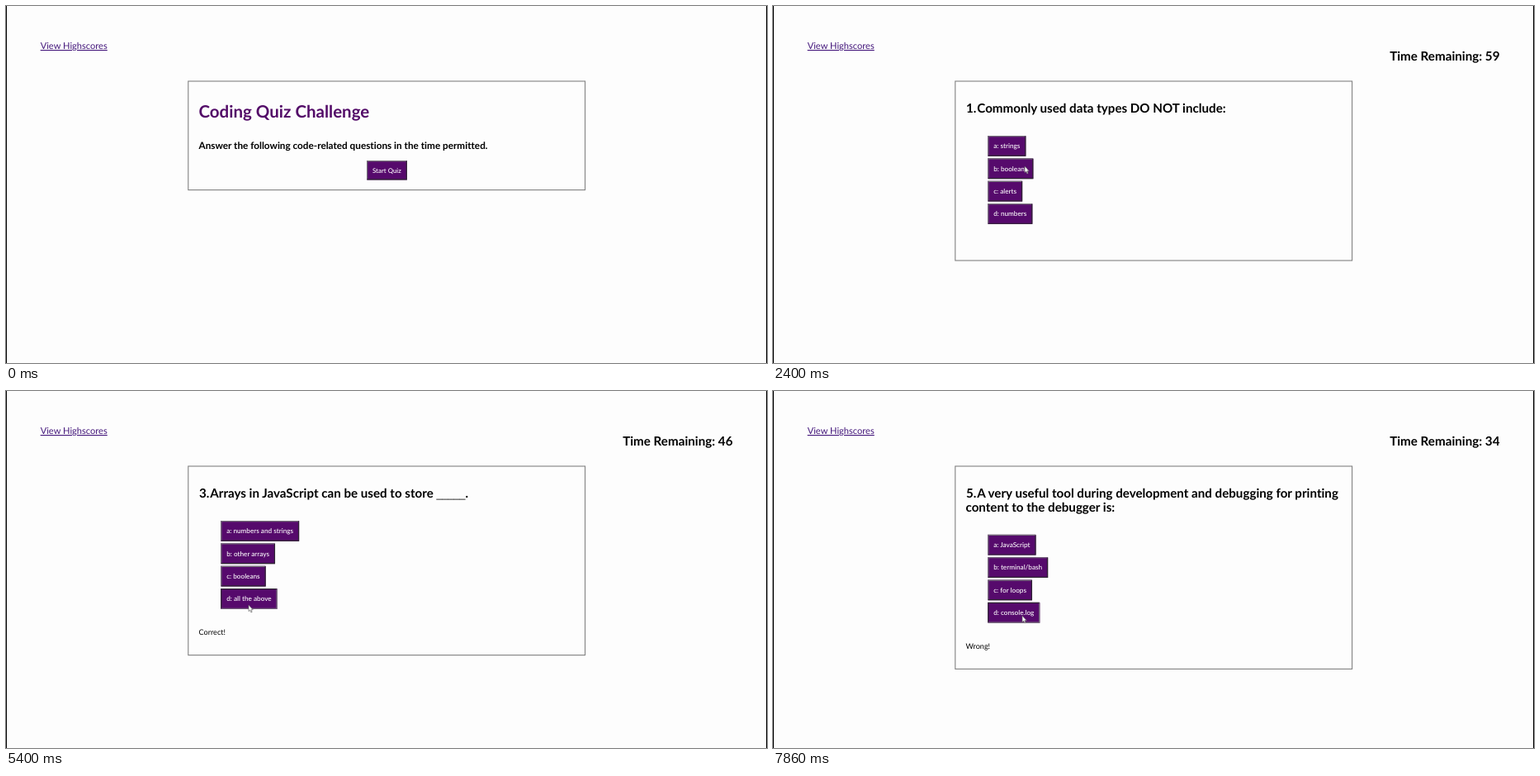
Animation, 922 px wide and 432 px high, one loop 8 s. Source, as an HTML page:

```html
<!DOCTYPE html>
<html lang="en">
<head>
<meta charset="utf-8">
<title>Quiz</title>
<style>
  html, body { margin: 0; width: 100%; height: 100%; overflow: hidden; background: #fdfdfd; }
  svg { display: block; width: 922px; height: 432px; }
  text { font-family: Lato, sans-serif; font-variant-ligatures: none; text-rendering: geometricPrecision; }
  .link { font-size: 11.1px; fill: #45187c; text-decoration: underline; }
  .title { font-size: 20.5px; font-weight: 700; fill: #530b68; }
  .intro { font-size: 11.75px; font-weight: 700; }
  .question { font-size: 15.15px; font-weight: 700; }
  .blank { font: 12.6px "Liberation Sans", sans-serif; }
  .timer { font-size: 15.2px; font-weight: 700; text-anchor: end; }
  .feedback { font-size: 9.1px; }
  .label { font-size: 8.2px; font-weight: 500; fill: #fff; }
  .label.start { font-size: 7.9px; }
  .face { fill: #560a6c; }
  .frame { fill: none; stroke: #808080; stroke-width: 1.1; }
  .edge { fill: none; stroke-width: 1.2; }
  .lit { stroke: #747078; }
  .shade { stroke: #2e2532; }
  .pressed .lit { stroke: #2e2532; }
  .pressed .shade { stroke: #747078; }
  .cursor { fill: #fff; stroke: #666; stroke-width: .7; }
</style>
</head>
<body>
<svg id="stage" viewBox="0 0 922 432"></svg>
<script>
const LOOP = 8000;
const STEP = 200 / 3;
const stage = document.getElementById('stage');

function add(parent, tag, attrs = {}, content = '') {
  const node = document.createElementNS('http://www.w3.org/2000/svg', tag);
  for (const key in attrs) node.setAttribute(key, attrs[key]);
  node.textContent = content;
  parent.append(node);
  return node;
}

const addText = (parent, cls, x, y, content) => add(parent, 'text', { class: cls, x, y }, content);

const addFrame = (parent, bottom) =>
  add(parent, 'rect', { class: 'frame', x: 220.8, y: 91, width: 480.8, height: bottom - 91 });

function addButton(parent, x, y, height, label, cls = '') {
  const group = add(parent, 'g');
  const face = add(group, 'rect', { class: 'face', x, y, height });
  const text = addText(group, 'label ' + cls, x + 7, y + height / 2 + 2.9, label);
  const width = text.getComputedTextLength() + 14;
  face.setAttribute('width', width);
  const left = x + .6, top = y + .6, right = x + width - .6, bottom = y + height - .6;
  add(group, 'path', { class: 'edge lit', d: `M${left} ${bottom}V${top}H${right}` });
  add(group, 'path', { class: 'edge shade', d: `M${right} ${top}V${bottom}H${left}` });
  return group;
}

function addQuestion(parent, x, y, content) {
  const line = addText(parent, 'question', x, y, '');
  for (const part of content.split(/(_+)/)) {
    add(line, 'tspan', part[0] === '_' ? { class: 'blank' } : {}, part);
  }
}

function introPage(page) {
  addFrame(page, 222.6);
  addText(page, 'title', 233.5, 134.5, 'Coding Quiz Challenge');
  addText(page, 'intro', 233.5, 173, 'Answer the following code-related questions in the time permitted.');
  return [addButton(page, 437, 187, 23.4, 'Start Quiz', 'start')];
}

function questionPage(page, { number, lines, answers, feedback }) {
  const shift = (lines.length - 1) * 16.8;
  addFrame(page, (feedback ? 319.6 : 308) + shift);
  addText(page, 'question', 234, 129, number + '.');
  lines.forEach((line, i) => addQuestion(page, i ? 233.5 : 247.3, 129 + i * 16.8, line));
  addText(page, 'feedback', 233.5, 295.2 + shift, feedback);
  return answers.map((answer, i) =>
    addButton(page, 260.2, 157 + i * 27.35 + shift, 24.8, 'abcd'[i] + ': ' + answer));
}

// press: time the chosen button goes down; choice: its index
const pages = [
  { start: 0, press: 1200, choice: 0 },
  { start: 1400, press: 2460, choice: 1, number: 1, feedback: '',
    lines: ['Commonly used data types DO NOT include:'],
    answers: ['strings', 'booleans', 'alerts', 'numbers'] },
  { start: 2660, press: 3460, choice: 2, number: 2, feedback: 'Wrong!',
    lines: ['The condition in an if/else statement is enclosed within ____.'],
    answers: ['quotes', 'curly brackets', 'parenthesis', 'square brackets'] },
  { start: 3800, press: 5390, choice: 3, number: 3, feedback: 'Correct!',
    lines: ['Arrays in JavaScript can be used to store _____.'],
    answers: ['numbers and strings', 'other arrays', 'booleans', 'all the above'] },
  { start: 5600, press: 6530, choice: 2, number: 4, feedback: 'Correct!',
    lines: ['String values must be enclosed within _____ when being assigned', 'variables.'],
    answers: ['commas', 'quotes', 'curly brackets', 'parenthesis'] },
  { start: 6800, press: 7855, choice: 3, number: 5, feedback: 'Wrong!',
    lines: ['A very useful tool during development and debugging for printing', 'content to the debugger is:'],
    answers: ['JavaScript', 'terminal/bash', 'for loops', 'console.log'] }
];

const ticks = [[0, ''], [2400, 59], [3400, 48], [4400, 47], [5330, 46], [6400, 45], [7400, 34]];

// [time, x, y] of the pointer tip
const route = [
  [130, 745, 257], [460, 548, 234], [930, 463.5, 197], [1800, 463.5, 197],
  [2260, 305, 194], [2860, 305, 194], [3060, 304.5, 200], [3460, 297, 228],
  [3800, 297, 228], [4060, 296.5, 231], [4600, 296.5, 231], [5060, 294, 259],
  [5860, 294, 259], [6260, 291, 236.5], [6800, 291, 236.5], [7260, 291, 238], [7800, 302, 272]
];

function pointerAt(time) {
  const next = route.findIndex(point => point[0] > time);
  if (next < 0) return route.at(-1).slice(1);
  const [t0, x0, y0] = route[next - 1], [t1, x1, y1] = route[next];
  const p = (time - t0) / (t1 - t0);
  const eased = p * p * (3 - 2 * p);
  return [x0 + (x1 - x0) * eased, y0 + (y1 - y0) * eased];
}

add(stage, 'path', { d: 'M.5 0V432M921.5 0V432', stroke: '#000' });
addText(stage, 'link', 41.7, 52, 'View Highscores');
const timer = addText(stage, 'timer', 880.5, 66.3, '');
for (const page of pages) {
  page.group = add(stage, 'g');
  page.button = (page.number ? questionPage(page.group, page) : introPage(page.group))[page.choice];
}
const cursor = add(stage, 'path', { class: 'cursor', d: 'M0 0V7.6L1.7 6.1L2.9 8.9L4.1 8.4L2.9 5.7H5.2Z' });

function draw(now) {
  const time = now % LOOP;
  const current = pages.findLast(page => page.start <= time);
  for (const page of pages) {
    page.group.style.display = page === current ? '' : 'none';
    page.button.classList.toggle('pressed', time >= page.press);
  }
  const seconds = ticks.findLast(tick => tick[0] <= time)[1];
  timer.textContent = seconds && 'Time Remaining: ' + seconds;

  const sampled = Math.floor((time + 5) / STEP) * STEP;
  const visible = sampled >= route[0][0];
  cursor.style.display = visible ? '' : 'none';
  if (visible) cursor.setAttribute('transform', `translate(${pointerAt(sampled)})`);
  requestAnimationFrame(draw);
}
requestAnimationFrame(draw);
</script>
</body>
</html>
```
